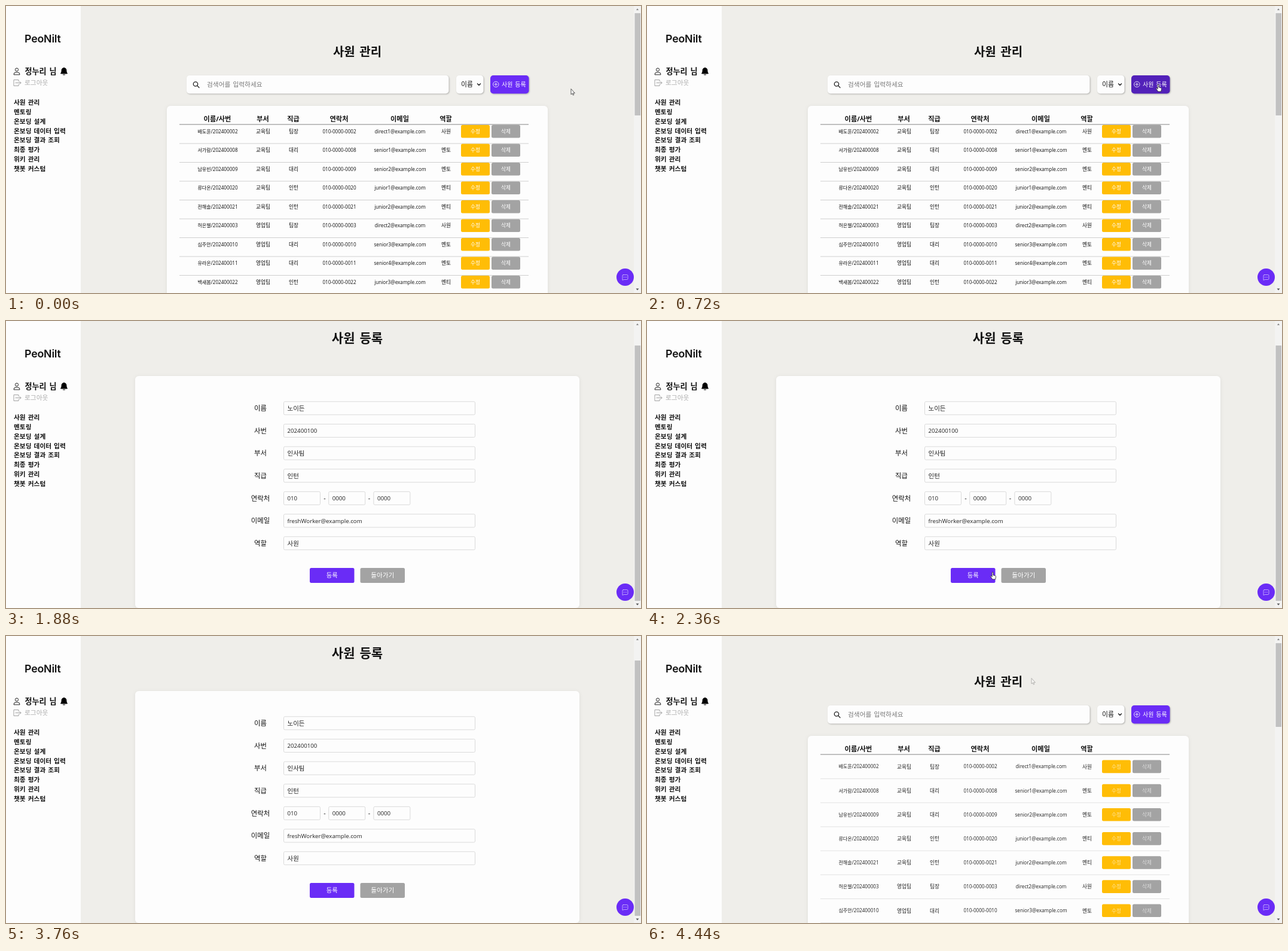
Write an HTML page that moves like this. It is 1062 px wide and 480 px high and loops after 4580 ms.

```html
<!DOCTYPE html>
<html lang="ko">
<head>
<meta charset="utf-8">
<title>사원 관리</title>
<style>
  html, body { margin: 0; width: 100%; height: 100%; overflow: hidden; background: #efeeea; }
  svg { display: block; width: 100%; height: 100%; }
  text { font-family: "Open Sans", "Noto Sans CJK KR", "Noto Sans CJK", sans-serif; white-space: pre; word-spacing: .12em; }
  .brand { font-family: Inter, sans-serif; letter-spacing: -.2px; }
  .soft { filter: drop-shadow(1.5px 1.5px 1px #0004); }
  .card { filter: drop-shadow(0 1px 3px #0001); }
</style>
</head>
<body>
<svg id="stage" viewBox="0 0 1062 480"></svg>
<script>
const LOOP = 4580;
const FORM_AT = 800, RETURN_AT = 3920;
const PURPLE = '#6a2cf6', YELLOW = '#ffbd06', GRAY = '#a3a3a3', WHITE = '#fdfdfd';

const stage = document.getElementById('stage');

function add(parent, tag, attrs = {}, content) {
  const node = document.createElementNS('http://www.w3.org/2000/svg', tag);
  for (const key in attrs) node.setAttribute(key, attrs[key]);
  if (content !== undefined) node.textContent = content;
  parent.append(node);
  return node;
}
const group = (parent, attrs) => add(parent, 'g', attrs);
const box = (parent, x, y, width, height, fill, attrs) =>
  add(parent, 'rect', { x, y, width, height, fill, ...attrs });
const path = (parent, d, attrs) =>
  add(parent, 'path', { d, fill: 'none', stroke: '#222', 'stroke-linecap': 'round', 'stroke-linejoin': 'round', ...attrs });

// Text centred vertically on y
const label = (parent, x, y, size, content, attrs) =>
  add(parent, 'text', { x, y: y + size * .37, 'font-size': size, fill: '#111', ...attrs }, content);
const centred = (parent, x, y, size, content, attrs) =>
  label(parent, x, y, size, content, { 'text-anchor': 'middle', ...attrs });
const bold = { 'font-weight': 700 };

// Returns the caption, so that it can fade
function button(parent, x, y, width, height, fill, content, size) {
  box(parent, x, y, width, height, fill, { rx: 2.5 });
  return centred(parent, x + width / 2, y + height / 2, size, content, { fill: '#fff' });
}

function buildSidebar() {
  const side = group(stage);
  box(side, 0, 0, 125, 480, WHITE);
  label(side, 31, 54, 17.8, 'PeoNilt', { class: 'brand', 'font-weight': 600 });
  add(side, 'circle', { cx: 18, cy: 106.5, r: 2.6, fill: 'none', stroke: '#222' });
  path(side, 'M13 114.5q0-3.5 3-3.5h4q3 0 3 3.5z');
  label(side, 31.5, 109.5, 13.1, '정누리 님', bold);
  path(side, 'M97 103.5c-3 0-4 2-4 5 0 2-.5 3-1.5 4.5h11c-1-1.5-1.5-2.5-1.5-4.5 0-3-1-5-4-5zM95.5 115h3', { fill: '#000', stroke: '#000' });
  path(side, 'M21 126v-2.5h-8v10h8v-2.5M16 128.5h9m-2.5-2.5l2.5 2.5-2.5 2.5', { stroke: GRAY });
  label(side, 31, 128.5, 10.7, '로그아웃', { fill: '#aaa' });
  ['사원 관리', '멘토링', '온보딩 설계', '온보딩 데이터 입력', '온보딩 결과 조회', '최종 평가', '위키 관리', '챗봇 커스텀']
    .forEach((item, i) => label(side, 13, 161.5 + i * 15.75, 10.7, item, { 'font-weight': 600 }));
}

function buildList() {
  const list = group(stage);
  centred(list, 587.5, 76.5, 20, '사원 관리', bold);

  box(list, 302, 116, 438.5, 30.5, WHITE, { rx: 5, class: 'soft' });
  add(list, 'circle', { cx: 317, cy: 130.5, r: 3.7, fill: 'none', stroke: '#222', 'stroke-width': 1.3 });
  path(list, 'M320 133.5l3 3', { 'stroke-width': 1.3 });
  label(list, 336, 131.5, 10.7, '검색어를 입력하세요', { fill: '#777' });

  box(list, 753, 116, 45.5, 30.5, WHITE, { rx: 5, class: 'soft' });
  label(list, 761, 131.5, 10.8, '이름');
  path(list, 'M788.5 130l2.5 2.5 2.5-2.5', { 'stroke-width': 1.5 });

  const register = box(list, 810, 116, 64.5, 30.5, PURPLE, { rx: 5, class: 'soft' });
  add(list, 'circle', { cx: 819.3, cy: 131, r: 4.7, fill: 'none', stroke: '#fff', 'stroke-width': .8 });
  path(list, 'M816.8 131h5m-2.5-2.5v5', { stroke: '#fff', 'stroke-width': .8 });
  label(list, 829, 131.5, 10, '사원 등록', { fill: '#fff' });

  box(list, 269, 167, 637, 330, WHITE, { rx: 6, class: 'card' });
  const columns = [353.5, 429.5, 480.5, 557, 658.5, 735.5];
  ['이름/사번', '부서', '직급', '연락처', '이메일', '역할']
    .forEach((title, i) => centred(list, columns[i], 188.5, 11.2, title, bold));

  const rowLayer = group(list);
  box(list, 290, 197.5, 584, 1.2, '#999');

  const people = [
    ['배도윤', 2], ['서가람', 8], ['남유빈', 9], ['류다온', 20], ['전해솔', 21],
    ['허은별', 3], ['심주안', 10], ['유라온', 11], ['백새봄', 22]
  ];
  const ranks = {
    lead: { title: '팀장', role: '사원', mail: 'direct', count: 0 },
    mid: { title: '대리', role: '멘토', mail: 'senior', count: 0 },
    intern: { title: '인턴', role: '멘티', mail: 'junior', count: 0 }
  };
  const rows = people.map(([name, id], i) => {
    const rank = ranks[id < 8 ? 'lead' : id < 20 ? 'mid' : 'intern'];
    const node = group(rowLayer);
    const cells = group(node);
    const number = String(id).padStart(4, '0');
    [
      [`${name}/20240${number}`, 8.15],
      [i < 5 ? '교육팀' : '영업팀', 8.7],
      [rank.title, 8.7],
      [`010-0000-${number}`, 8.1],
      [`${rank.mail}${++rank.count}@example.com`, 8.2],
      [rank.role, 8.7]
    ].forEach(([content, size], c) => centred(cells, columns[c] + .5, 0, size, content));
    const captions = [
      button(node, 761, -10.8, 48, 21.6, YELLOW, '수정', 8.7),
      button(node, 812, -10.8, 48, 21.6, GRAY, '삭제', 8.7)
    ];
    const rule = box(node, 290, 19.8, 584, 1, '#cfcfcf');
    return { node, cells, fading: [...captions, rule] };
  });
  return { list, register, rows };
}

function buildForm() {
  const form = group(stage);
  centred(form, 587.5, 28, 21, '사원 등록', bold);
  box(form, 216, 92, 743, 388, WHITE, { rx: 6, class: 'card' });

  const field = (x, y, width, value, size) => {
    box(form, x + .5, y - 11, width, 22, WHITE, { rx: 2, stroke: '#dadada' });
    label(form, x + 6.5, y, size, value, { fill: '#222' });
  };
  [
    ['이름', '노이든', 10.5], ['사번', '202400100', 9.7], ['부서', '인사팀', 10.5], ['직급', '인턴', 10.5],
    ['연락처'], ['이메일', 'freshWorker@example.com', 9.7], ['역할', '사원', 10.5]
  ].forEach(([title, value, size], i) => {
    const y = 145.8 + i * 37.65;
    centred(form, 425.5, y, 11.4, title);
    if (value) return field(464, y, 320, value, size);
    ['010', '0000', '0000'].forEach((part, p) => field(464 + p * 75.2, y, 61, part, 9.7));
    [533, 607.5].forEach(x => centred(form, x, y, 10.5, '-'));
  });
  button(form, 508, 413, 74.5, 25, PURPLE, '등록', 10.3);
  button(form, 592.5, 413, 74.5, 25, GRAY, '돌아가기', 10.6);
  return form;
}

function buildOverlay() {
  const chat = group(stage);
  add(chat, 'circle', { cx: 1035.5, cy: 453.5, r: 14.5, fill: PURPLE });
  const bubble = group(chat, { opacity: .8 });
  path(bubble, 'M1032.5 449.5h6q1.5 0 1.5 1.5v5q0 1.5-1.5 1.5h-5l-2.5 1v-7.5q0-1.5 1.5-1.5z', { stroke: '#fff', 'stroke-width': .7 });
  [1033.3, 1035.5, 1037.7].forEach(cx => add(bubble, 'circle', { cx, cy: 453.5, r: .6, fill: '#fff' }));

  box(stage, 1050, 0, 12, 480, '#f3f3f2');
  path(stage, 'M1054 7l2-3 2 3z', { fill: '#888', stroke: 'none' });
  path(stage, 'M1053.5 472.5h5l-2.5 3z', { fill: '#555', stroke: 'none' });
  const thumb = box(stage, 1051.5, 12, 9.5, 171, '#c1c1c1');

  const pointer = group(stage);
  const arrow = path(pointer, 'M0 0v9l2-1.8 1.4 3 1.4-.6-1.4-2.9h2.6z', { fill: '#fff', stroke: '#333', 'stroke-width': .8 });
  const hand = path(pointer, 'M-1 1q0-1 1-1t1 1v4l3.5 1q1.2.4 1 1.7l-.8 4.3h-5l-3-4.5q-.4-1.2.8-1.2l1.5 1.2z', { fill: '#fff', stroke: '#222', 'stroke-width': .8 });
  return { thumb, pointer, arrow, hand };
}

const show = (node, visible) => node.setAttribute('visibility', visible ? 'inherit' : 'hidden');
const progress = (t, from, to) => Math.min(1, Math.max(0, (t - from) / (to - from)));
const smooth = p => p * p * (3 - 2 * p);
const mix = (a, b, p) => a + (b - a) * p;

// The pointer is hidden outside these stretches
const moves = [
  { show: 0, hide: FORM_AT, start: 120, end: 480, from: [945, 139], to: [855, 131] },
  { show: 1900, hide: 2480, start: 1900, end: 2240, from: [625, 374], to: [578, 420] },
  { show: 2480, hide: 3560, start: 2480, end: 2900, from: [578, 420], to: [642, 71] },
  { show: 4000, hide: LOOP, start: 4040, end: 4400, from: [636, 71], to: [643, 71] }
];

buildSidebar();
const { list, register, rows } = buildList();
const form = buildForm();
const { thumb, pointer, arrow, hand } = buildOverlay();

function drawPointer(t) {
  const move = moves.find(m => t >= m.show && t < m.hide);
  show(pointer, !!move);
  if (!move) return;
  const p = smooth(progress(t, move.start, move.end));
  const [x, y] = [0, 1].map(axis => mix(move.from[axis], move.to[axis], p));
  const onRegister = t < FORM_AT && x < 875;
  const onSubmit = t > FORM_AT && t < RETURN_AT && x < 583 && y > 413;
  pointer.setAttribute('transform', `translate(${x} ${y})`);
  pointer.setAttribute('opacity', t > RETURN_AT ? .4 : 1);
  show(hand, onRegister || onSubmit);
  show(arrow, !onRegister && !onSubmit);
  register.setAttribute('fill', onRegister ? '#5221b9' : PURPLE);
}

function draw(t) {
  const inForm = t >= FORM_AT && t < RETURN_AT;
  const returned = t >= RETURN_AT;
  show(list, !inForm);
  show(form, inForm);

  thumb.setAttribute('y', inForm ? 41 : 12);
  thumb.setAttribute('height', inForm ? 427 : returned ? 140 : 171);

  // Rows come into focus after returning to the list
  const clarity = returned ? progress(t, RETURN_AT, LOOP + 200) : 1;
  const [top, pitch] = returned ? [218.4, 40.15] : [209.7, 31.5];
  rows.forEach(({ node, cells, fading }, i) => {
    node.setAttribute('transform', `translate(0 ${top + i * pitch})`);
    cells.style.filter = clarity < 1 ? `blur(${1 - clarity}px)` : 'none';
    cells.setAttribute('opacity', mix(.8, 1, clarity));
    fading.forEach(part => part.setAttribute('opacity', clarity));
  });
  drawPointer(t);
}

function frame() {
  draw(performance.now() % LOOP);
  requestAnimationFrame(frame);
}
frame();
</script>
</body>
</html>
```
